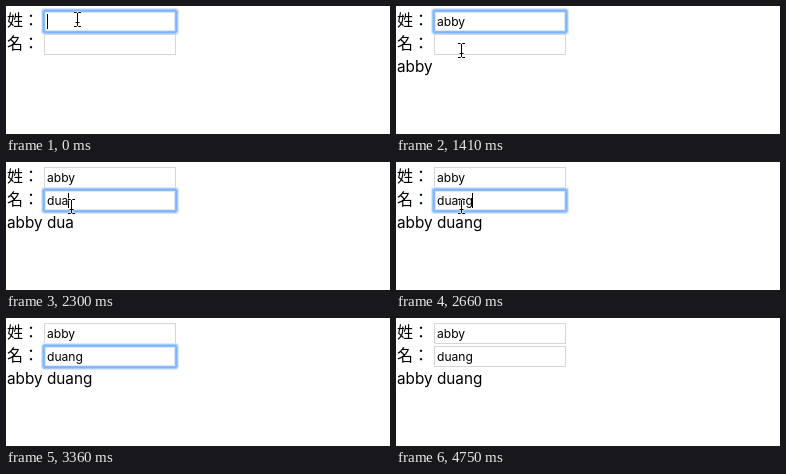
These frames come from a looping animation (384x128 px, 4810 ms). An HTML page:

```html
<!DOCTYPE html>
<html lang="zh-Hant">
<head>
<meta charset="utf-8">
<style>
  html, body { margin: 0; width: 100%; height: 100%; overflow: hidden; background: #fff; }
  svg { display: block; }
  text { font: 15.3px Inter, sans-serif; }
  .label { font: 16px "Noto Sans CJK TC", "Noto Sans CJK", sans-serif; }
  .value { font-size: 12.1px; }
  #arrow { filter: drop-shadow(0 1px 1px #0007); }
</style>
</head>
<body>
<svg width="384" height="128" viewBox="0 0 384 128">
  <defs>
    <g id="ring" fill="none"></g>
    <path id="beam" d="M-3 -6.5h2.5l1 1 1-1H4M.5 -6V7M-3 7.5h2.5l1-1 1 1H4M-1.5 3.5h4"/>
  </defs>

  <text class="label" x="1" y="20">姓：</text>
  <text class="label" x="1" y="43">名：</text>
  <g class="field" transform="translate(38 5)"></g>
  <g class="field" transform="translate(38 28)"></g>
  <text id="output" x="1" y="66"></text>

  <g id="pointer">
    <g id="ibeam" fill="none">
      <use href="#beam" stroke="#fff" stroke-width="2.5" opacity=".7"/>
      <use href="#beam" stroke="#000"/>
    </g>
    <path id="arrow" d="M.5 1V17L4.2 13.4L6.8 19.2L9.4 18L6.8 12.4H11.6Z" stroke="#fff"/>
  </g>
</svg>
<script>
const LOOP = 4810, SWITCH = 1530, BLUR = 4750, BLINK = 487, POINTER_STEP = 55;

const byId = id => document.getElementById(id);
const show = (el, on) => el.setAttribute("visibility", on ? "visible" : "hidden");

// Focus glow: nested outlines, from the outside in
byId("ring").innerHTML = ["#d9e8fd", "#a3cafc", "#80b4fb", "#8cbaf9", "#dbe9fd"].map((color, i) => {
  const out = 2.5 - i;
  return `<rect x="${-out}" y="${-out}" width="${132 + 2 * out}" height="${21 + 2 * out}"
    rx="${Math.max(0, out)}" stroke="${color}"/>`;
}).join("");

const fields = [
  { word: "abby", keys: [180, 300, 590, 830], focus: 0, blur: SWITCH },
  { word: "duang", keys: [1880, 2000, 2300, 2480, 2660], focus: SWITCH, blur: BLUR }
];

document.querySelectorAll(".field").forEach((el, i) => {
  el.innerHTML = `
    <rect x=".5" y=".5" width="131" height="20" fill="#fff" stroke="#d6d6d6"/>
    <use href="#ring"/>
    <path stroke="#f0433a" stroke-width="1.8" stroke-linecap="round" stroke-dasharray="0 3"/>
    <text class="value" x="3" y="15"></text>
    <rect y="3" width="1" height="15"/>`;
  const [, ring, squiggle, text, caret] = el.children;
  Object.assign(fields[i], { ring, squiggle, text, caret });
});

function drawField({ word, keys, focus, blur, ring, squiggle, text, caret }, t) {
  const typed = keys.filter(k => k <= t).length;
  const value = word.slice(0, typed);
  const focused = t >= focus && t < blur;
  const blinks = Math.floor((t - (keys[typed - 1] ?? focus)) / BLINK);

  text.textContent = value;
  const end = 3 + (value ? text.getComputedTextLength() : 0);
  caret.setAttribute("x", Math.floor(end));
  squiggle.setAttribute("d", `M4.5 16.9H${end - 1}`);
  show(ring, focused);
  show(caret, focused && blinks % 2 === 0);
  show(squiggle, focused && typed === word.length && blinks >= 2);
  return value;
}

// Share of a pointer move that is done, advancing in even steps
const progress = (t, start, steps) =>
  Math.min(1, Math.max(0, Math.floor((t - start) / POINTER_STEP) + 1) / steps);

function drawPointer(t) {
  const down = progress(t, 1130, 6), away = progress(t, 2960, 9);
  const x = 71 - 6 * down + 268 * (1 - (1 - away) ** 3);
  const y = 13 + 31 * down + 95 * away;
  const overField = x < 170 && y < 49;
  byId("pointer").setAttribute("transform", `translate(${Math.round(x)} ${Math.round(y)})`);
  show(byId("ibeam"), overField);
  show(byId("arrow"), !overField);
}

const start = performance.now();
function tick() {
  const t = (performance.now() - start) % LOOP;
  byId("output").textContent = fields.map(field => drawField(field, t)).join(" ").trim();
  drawPointer(t);
  requestAnimationFrame(tick);
}
tick();
</script>
</body>
</html>
```
